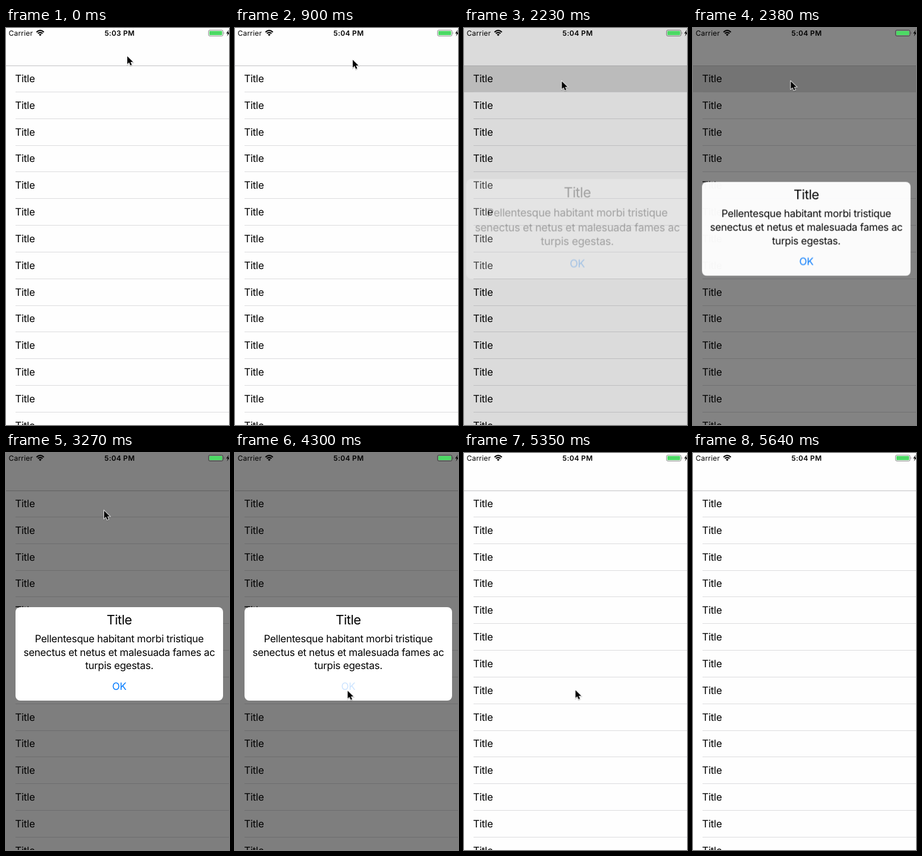
Recreate the animation shown at these times as an HTML page. Size 375x667 px, loop 6540 ms.

```html
<!DOCTYPE html>
<html lang="en">
<head>
<meta charset="utf-8">
<title>Alert demo</title>
<style>
  html, body { margin: 0; width: 100%; height: 100%; overflow: hidden; background: #fefefe; }
  body {
    position: relative;
    color: #000;
    font: 17px/22.4px Inter, Roboto, sans-serif;
    letter-spacing: -.28px;
    text-rendering: geometricPrecision;
    --loop: 6540ms step-end infinite;
  }
  .nav, .row, .line, .dim, .alert, .status, .cursor { position: absolute; }

  .nav { left: 0; top: 63px; width: 375px; height: 1px; background: #c3c3c4; }
  .row { left: 0; width: 375px; height: 44.83px; padding-left: 15.3px; box-sizing: border-box; line-height: 46.6px; }
  .line { left: 16px; right: 0; height: 1px; background: #dcdcde; }
  .row:first-child { animation: select var(--loop); }

  .dim { inset: 0; background: #000; opacity: 0; animation: dim var(--loop); }

  .alert {
    left: 15.5px; top: 259.3px; width: 349px; height: 156.6px;
    border-radius: 8px; background: #fff; text-align: center;
    opacity: 0; animation: alert var(--loop);
  }
  .alert > * { position: absolute; left: 0; width: 100%; margin: 0; white-space: nowrap; }
  .alert h1 { top: 7.8px; font-size: 22px; line-height: 28px; font-weight: 400; letter-spacing: -.5px; }
  .alert p { top: 43.2px; }
  .alert b { top: 122.8px; font-weight: 400; color: #007aff; animation: press var(--loop); }

  .status { left: 0; top: 0; width: 375px; height: 17px; font-size: 12px; line-height: 17px; letter-spacing: .2px; }
  .status span { position: absolute; left: 4.5px; }
  .status .time { left: 141px; width: 100px; text-align: center; font-weight: 600; letter-spacing: .3px; }
  .before { animation: before var(--loop); }
  .after { animation: after var(--loop); }
  .status svg { position: absolute; left: 0; top: 0; }

  .cursor {
    left: 0; top: 0; overflow: visible;
    filter: drop-shadow(0 1px .7px rgba(0, 0, 0, .3));
    animation: move var(--loop);
  }

  @keyframes before { 0% { opacity: 1; } 2.29%, 100% { opacity: 0; } }
  @keyframes after { 0% { opacity: 0; } 2.29%, 100% { opacity: 1; } }
  @keyframes select {
    0% { background: transparent; }
    34.09% { background: #d9d9d9; }
    36.39% { background: #e1e1e1; }
    38.68%, 100% { background: transparent; }
  }
  @keyframes dim {
    0% { opacity: 0; }
    34.09% { opacity: .137; }
    36.39% { opacity: .485; }
    38.68% { opacity: .5; }
    79.51% { opacity: .07; }
    81.8%, 100% { opacity: 0; }
  }
  @keyframes alert {
    0% { opacity: 0; transform: none; }
    34.09% { opacity: .27; transform: scale(1.07); }
    36.39% { opacity: .97; transform: scale(1.005); }
    38.68% { opacity: 1; transform: none; }
    79.51% { opacity: .15; transform: none; }
    81.8%, 100% { opacity: 0; transform: none; }
  }
  @keyframes press {
    0% { opacity: 1; }
    65.74% { opacity: .2; }
    79.51%, 100% { opacity: .45; }
  }
  @keyframes move {
    0% { transform: translate(203px, 46px); }
    13.76% { transform: translate(197px, 52px); }
    16.05% { transform: translate(191px, 59px); }
    18.19% { transform: translate(185px, 65px); }
    20.48% { transform: translate(178px, 77px); }
    22.78% { transform: translate(170px, 83px); }
    25.07% { transform: translate(163.5px, 88px); }
    45.41% { transform: translate(163.5px, 88.5px); }
    47.7% { transform: translate(163.5px, 95px); }
    49.99% { transform: translate(164px, 95.5px); }
    54.58% { transform: translate(165px, 142.5px); }
    56.72% { transform: translate(202px, 247.5px); }
    59.02% { transform: translate(205px, 380px); }
    61.31% { transform: translate(186.5px, 399px); }
    63.45% { transform: translate(187px, 399.5px); }
    65.74% { transform: translate(188.5px, 398px); }
    79.51% { transform: translate(186.5px, 397px); }
    83.94% { transform: translate(195.5px, 455px); opacity: 1; }
    86.23%, 100% { transform: translate(195.5px, 455px); opacity: 0; }
  }
</style>
</head>
<body>
  <div id="list"></div>
  <div class="nav"></div>
  <div class="dim"></div>

  <div class="alert">
    <h1>Title</h1>
    <p>Pellentesque habitant morbi tristique<br>senectus et netus et malesuada fames ac<br>turpis egestas.</p>
    <b>OK</b>
  </div>

  <div class="status">
    <span>Carrier</span>
    <span class="time before">5:03 PM</span>
    <span class="time after">5:04 PM</span>
    <svg width="375" height="17">
      <g fill="none" stroke="#000" stroke-width="2.1">
        <path d="M51.3 6.9Q57.5 1.1 63.7 6.9"/>
        <path d="M53.6 9.3Q57.5 5.8 61.4 9.3"/>
      </g>
      <path d="M55.2 11Q57.5 9.2 59.8 11L57.5 13.4Z"/>
      <rect x="340.5" y="3.5" width="24.5" height="10" rx="2.4" fill="none" stroke="#000" stroke-opacity=".45"/>
      <rect x="342" y="5" width="21.5" height="7" rx="1.1" fill="#4cd964"/>
      <path d="M366.2 6.6Q368 8.5 366.2 10.4Z" fill-opacity=".45"/>
      <path d="M374.6 3L370.3 9.2H373L371.6 14L376 7.6H373.3Z"/>
    </svg>
  </div>

  <svg class="cursor" width="12" height="19">
    <path d="M1 1.5V14.6L4 11.8L6.2 16.8L8.5 15.8L6.4 11H10.6Z" stroke="#fff" stroke-width="1.7" paint-order="stroke"/>
  </svg>

<script>
  const list = document.getElementById('list');
  const top0 = 63, pitch = 44.83, count = 14;

  function add(className, y, text = '') {
    const el = document.createElement('div');
    el.className = className;
    el.style.top = y + 'px';
    el.textContent = text;
    list.append(el);
  }

  for (let i = 0; i < count; i++) {
    add('row', top0 + i * pitch, 'Title');
    add('line', Math.floor(top0 + (i + 1) * pitch - .4));
  }
</script>
</body>
</html>
```
